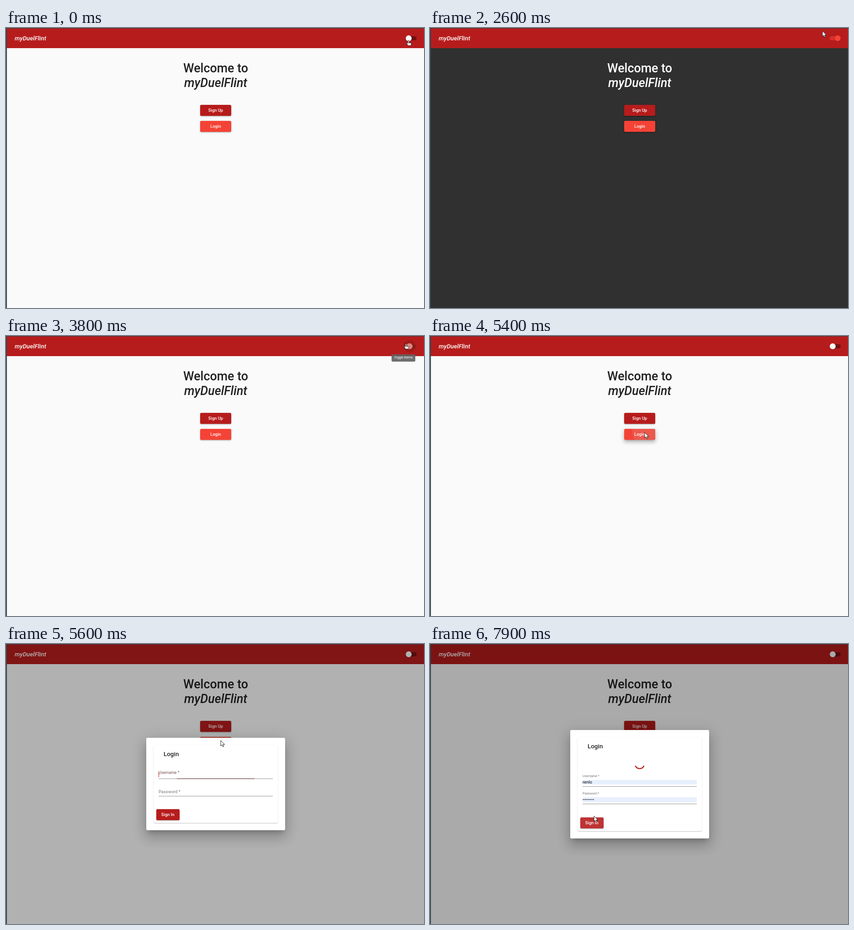
An HTML page that plays this animation: 915 px wide and 612 px high, repeating every 8000 ms.

```html
<!DOCTYPE html>
<html lang="en">
<head>
<meta charset="utf-8">
<title>Login demo</title>
<style>
  html, body { margin: 0; width: 100%; height: 100%; overflow: hidden; }
  #stage { position: relative; width: 915px; height: 612px; overflow: hidden; background: #fafafa;
    font: 400 9.38px/20px Roboto, sans-serif; color: rgba(0,0,0,.87); cursor: default; }
  #stage.dark { background: #303030; color: #fff; }
  #stage div, #stage span, #stage svg { position: absolute; white-space: pre; }

  /* elevation --z, page zoom 67% */
  .raised { --u: .67px; box-shadow:
    0 calc((var(--z)*.4 + 1.2)*var(--u)) calc(var(--z)*.62*var(--u)) calc((var(--z)*-.25 - 1)*var(--u)) rgba(0,0,0,.2),
    0 calc(var(--z)*var(--u)) calc((var(--z)*1.6 - 1)*var(--u)) calc(var(--z)*.12*var(--u)) rgba(0,0,0,.14),
    0 calc((var(--z)*.35 + .7)*var(--u)) calc((var(--z)*1.9 + 1.2)*var(--u)) calc(var(--z)*.33*var(--u)) rgba(0,0,0,.12); }

  .edge { left: 0; top: 0; background: #37434a; }
  #bar { left: 2px; top: 1px; width: 913px; height: 43px; background: #b71c1c; color: #fff; }
  .logo { font-style: italic; }
  #bar .logo { left: 17px; top: 11.5px; font-size: 13.4px; font-weight: 500; }
  .head { left: 259px; width: 400px; text-align: center; font-size: 26.8px; line-height: 32px; font-weight: 500; }

  .btn { --z: 2; border-radius: 2.7px; width: 68px; height: 24.2px; line-height: 24.2px; overflow: hidden;
    color: #fff; background: #b71c1c; font-weight: 500; text-align: center; }
  .btn.down { --z: 8; }
  .btn span { left: 0; top: 0; width: 100%; }
  #signUp { left: 425px; top: 168px; }
  #login { left: 425px; top: 203.2px; background: #f44336; }
  #signIn { left: 22px; top: 156.3px; width: 50.5px; }

  .wave { border-radius: 50%; transform: translate(-50%, -50%); }
  #loginWave { left: 45px; top: 8px; background: #ec594d; }
  #signWave { left: 30px; top: 15px; background: rgba(255,255,255,.1); }
  #halo { top: 22.4px; background: #000; }

  #track { left: 875px; top: 17.7px; width: 24px; height: 9.4px; border-radius: 4.7px; }
  #thumb { --z: 1; top: 15.7px; width: 13.4px; height: 13.4px; border-radius: 50%; }
  #tip { left: 844px; top: 40px; width: 52px; height: 15.5px; line-height: 15.5px; border-radius: 2.7px;
    background: rgba(97,97,97,.9); color: #fff; font-size: 6.7px; text-align: center; }

  #shade { left: 2px; top: 1px; width: 913px; height: 611px; background: #000; }
  #dialog { --z: 24; left: 307px; width: 304px; border-radius: 2.7px; background: #fff; color: rgba(0,0,0,.87); }
  #card { --z: 1; left: 16.3px; top: 16px; right: 16.2px; bottom: 16px; border-radius: 2.7px; }
  #dialog .title { left: 38px; top: 25.5px; font-size: 13.4px; font-weight: 500; }
  #form { left: 0; width: 304px; height: 202px; }
  .field { left: 27px; width: 250px; height: 30px; }
  .field * { left: 0; }
  .fill { top: 4.5px; width: 250px; height: 10.4px; background: #e8f0fe; }
  .value { top: -.5px; color: #000; }
  .line, #focus { top: 18.6px; width: 250px; height: 1px; background: rgba(0,0,0,.42); }
  #caret { top: 4.5px; width: 1px; height: 11px; background: #b71c1c; }
  #spin { left: 139.5px; top: 62px; width: 24px; height: 24px; }
  #cursor { left: 0; top: 0; width: 915px; height: 612px; }
</style>
</head>
<body>
<div id="stage">
  <div id="bar"><span class="logo">myDuelFlint</span></div>
  <div id="track"></div><div id="thumb" class="raised"></div><div id="halo" class="wave"></div>
  <div class="head" style="top:72px">Welcome to</div>
  <div class="head logo" style="top:104px">myDuelFlint</div>
  <div class="btn raised" id="signUp"><span>Sign Up</span></div>
  <div class="btn raised" id="login"><div class="wave" id="loginWave"></div><span>Login</span></div>
  <div id="tip">Toggle theme</div>
  <div id="shade"></div>
  <div id="dialog" class="raised">
    <div id="card" class="raised"></div>
    <span class="title">Login</span>
    <svg id="spin" viewBox="-12 -12 24 24"><path id="arc" fill="none" stroke="#b71c1c" stroke-width="2.2"/></svg>
    <div id="form">
      <div class="field" style="top:70.1px">
        <div class="fill"></div><span id="userLabel">Username *</span><span class="value">renlo</span>
        <div class="line"></div><div id="focus"></div><div id="caret"></div>
      </div>
      <div class="field" style="top:108.3px">
        <div class="fill"></div><span id="passLabel">Password *</span><span class="value">••••••••</span>
        <div class="line"></div>
      </div>
      <div class="btn raised" id="signIn"><div class="wave" id="signWave"></div><span>Sign In</span></div>
    </div>
  </div>
  <div class="edge" style="width:2px;height:612px"></div>
  <div class="edge" style="width:915px;height:1px"></div>
  <svg id="cursor" viewBox="0 0 915 612">
    <g id="pointer" fill="#fff" stroke="#111" stroke-width=".9" stroke-linejoin="round">
      <path id="arrow" d="M0 0V12l2.8-2.6 1.9 4.4 2-.9-1.9-4.2h3.9z"/>
      <path id="hand" d="M-1.2 1.2a1.2 1.2 0 0 1 2.4 0V4.5l3.6.8q1.6.4 1.4 2l-.6 3.2q-.2.8-.8 1h-5q-.6-.1-1-.8l-2.6-3.6q-.6-1 .3-1.6.8-.4 1.6.4l.7.7zM1.2 4.5v2M3.1 5v1.7"/>
    </g>
  </svg>
</div>
<script>
const LOOP = 8000, STEP = 100;
const $ = id => document.getElementById(id);
const stage = $('stage');
const clamp = v => Math.max(0, Math.min(1, v));
const lerp = (a, b, p) => a + (b - a) * p;
const ramp = (t, start, length) => clamp((t - start) / length);
const pulse = (t, on, off, length) => ramp(t, on, length) - ramp(t, off, length);
const easeOut = p => 1 - (1 - p) ** 4;
const smooth = p => p * p * (3 - 2 * p);
const mix = (a, b, p) => `rgba(${a.map((v, i) => lerp(v, b[i], p)).join(',')})`;
const show = (el, on) => { el.style.display = on ? '' : 'none'; };

const RED = [183, 28, 28, 1], ACCENT = [244, 67, 54, 1], WHITE = [250, 250, 250, 1];
const DARK = 1066, LIGHT = 3730;
const OPEN = 5410, FOCUS = 5568, FILLED = 5700, PRESS = 7500, WAIT = 7800;

// the pointer glides to each place in turn
const GLIDES = [
  { start: 0, end: 200, x: 883.5, y: 22 },
  { start: 1500, end: 2100, x: 457, y: 211 },
  { start: 2200, end: 2600, x: 859, y: 6.5 },
  { start: 2600, end: 2800, x: 880, y: 15 },
  { start: 3000, end: 3200, x: 875.5, y: 17 },
  { start: 3900, end: 4450, x: 470, y: 211 },
  { start: 5700, end: 6100, x: 430, y: 340 },
  { start: 6900, end: 7300, x: 359, y: 376 }
];

function drawPointer(t) {
  let x = 881, y = 27;
  for (const g of GLIDES) {
    const p = smooth(ramp(t, g.start, g.end - g.start));
    x = lerp(x, g.x, p);
    y = lerp(y, g.y, p);
  }
  $('pointer').setAttribute('transform', `translate(${x} ${y})`);
  const hand = x > 870 && y > 13 && y < 30;
  show($('hand'), hand);
  show($('arrow'), !hand);
}

function drawWave(el, radius, opacity) {
  el.style.width = el.style.height = radius * 2 + 'px';
  el.style.opacity = opacity;
}

function drawToggle(t) {
  const tint = pulse(t, DARK + 25, LIGHT + 25, 100);
  const x = lerp(881.7, 892.3, pulse(t, DARK, LIGHT, 80));
  $('thumb').style.left = x - 6.7 + 'px';
  $('thumb').style.background = mix(WHITE, ACCENT, tint);
  $('track').style.background = mix([0, 0, 0, .38], [244, 67, 54, .54], tint);

  const click = t < 3000 ? DARK : LIGHT;
  $('halo').style.left = x + 'px';
  drawWave($('halo'), 13.4 * easeOut(ramp(t, click - 66, 200)), .12 * pulse(t, click - 66, click + 80, 160));
  $('tip').style.opacity = pulse(t, 50, 1000, 150) + pulse(t, 3450, 3950, 150);
}

function drawLabel(el, float, red) {
  el.style.top = lerp(-.5, -13.7, float) + 'px';
  el.style.fontSize = 9.38 * lerp(1, .75, float) + 'px';
  el.style.color = mix([0, 0, 0, .54], RED, red);
}

function drawSpinner(t) {
  const p = (t - WAIT) / STEP, r = 10.3;
  const mid = lerp(30, 90, p), half = lerp(40, 67, p);
  const point = deg => {
    const a = deg * Math.PI / 180;
    return `${r * Math.cos(a)} ${r * Math.sin(a)}`;
  };
  $('arc').setAttribute('d', `M${point(mid - half)}A${r} ${r} 0 0 1 ${point(mid + half)}`);
}

function drawFields(t) {
  const filled = t >= FILLED;
  document.querySelectorAll('.fill, .value').forEach(el => show(el, filled));
  const float = easeOut(ramp(t, FOCUS, 400)), blur = easeOut(ramp(t, PRESS, 400));
  drawLabel($('userLabel'), float, Math.min(1, float * 1.4) - blur);
  drawLabel($('passLabel'), easeOut(ramp(t, FILLED, 400)), 0);

  const spread = easeOut(ramp(t, FOCUS, 300));
  const focus = $('focus').style;
  focus.width = lerp(125, 250, spread) + 'px';
  focus.left = lerp(62.5, 0, spread) + 'px';
  focus.background = mix([20, 20, 20, 1], RED, spread);
  focus.opacity = t < FOCUS ? 0 : 1 - ramp(t, PRESS, 100);

  const blink = t < 6300 || (t >= 6900 && t < 7400);
  show($('caret'), t >= FOCUS && blink);
  $('caret').style.left = (filled ? 21 : 0) + 'px';
}

function drawDialog(t) {
  const waiting = t >= WAIT;
  $('shade').style.opacity = .32 * easeOut(ramp(t, OPEN, 400));
  show($('dialog'), t >= OPEN);

  const dialog = $('dialog').style;
  const grow = 1 - (1 - ramp(t, OPEN, 150)) ** 3;
  dialog.top = (waiting ? 188 : 205) + 'px';
  dialog.height = (waiting ? 237 : 202) + 'px';
  dialog.opacity = grow;
  dialog.transform = grow < 1 ? `scale(${lerp(.7, 1, grow)})` : 'none';
  $('form').style.top = (waiting ? 34.5 : 0) + 'px';
  show($('spin'), waiting);
  drawSpinner(t);
  drawFields(t);
  $('signIn').classList.toggle('down', t >= PRESS && !waiting);
  drawWave($('signWave'), 38 * easeOut(ramp(t, PRESS - 50, 300)), 1);
}

function draw(t) {
  stage.classList.toggle('dark', t >= DARK && t < LIGHT);
  drawToggle(t);
  $('login').classList.toggle('down', t >= OPEN - 60 && t < 5600);
  drawWave($('loginWave'), 48 * easeOut(ramp(t, OPEN - 52, 225)), 1 - ramp(t, OPEN + 40, 250));
  drawDialog(t);
  drawPointer(t);
}

const begin = performance.now();
function tick() {
  const t = Math.max(0, performance.now() - begin) % LOOP;
  draw(Math.floor(t / STEP) * STEP);
  requestAnimationFrame(tick);
}
tick();
</script>
</body>
</html>
```
